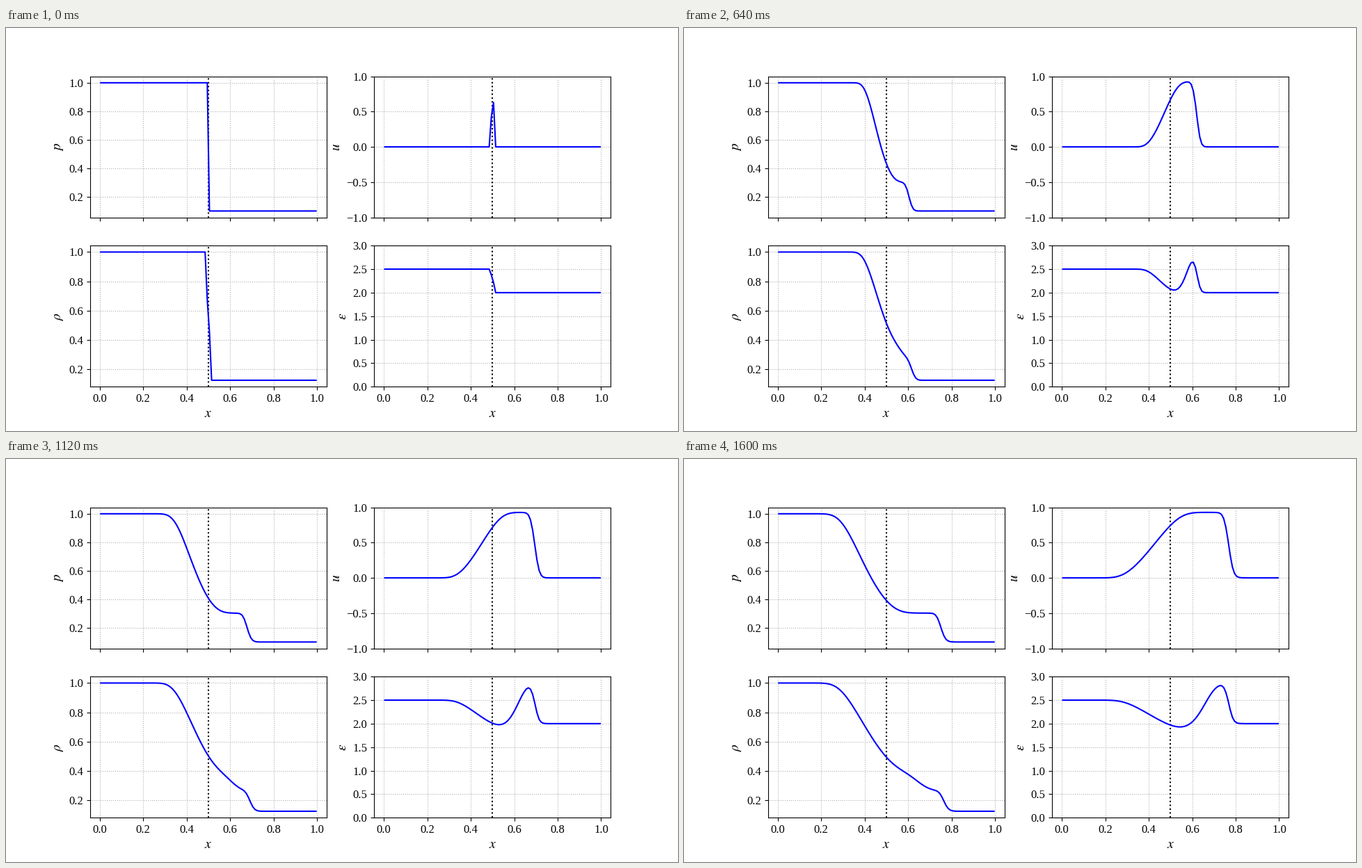
These frames come from a looping animation (966x580 px, 1640 ms). A matplotlib script:

```python
import numpy as np
import matplotlib.pyplot as plt
from matplotlib.animation import FuncAnimation

plt.rcParams.update({
    "font.family": "Liberation Serif",
    "mathtext.fontset": "stix",
    "font.size": 12,
    "axes.labelsize": 14,
})

GAMMA = 1.4
CELLS = 100
CFL = 0.75
FRAMES = 41
DX = 1 / CELLS
x = (np.arange(CELLS) + 0.5) * DX


def primitives(state):
    """Density, velocity, pressure and internal energy of a state."""
    rho, mom, energy = state
    u = mom / rho
    eps = energy / rho - 0.5 * u**2
    return rho, u, (GAMMA - 1) * rho * eps, eps


def advance(state):
    """One first-order step with Rusanov fluxes and open ends."""
    padded = np.pad(state, ((0, 0), (1, 1)), mode="edge")
    rho, u, p, _ = primitives(padded)
    speed = np.max(np.abs(u) + np.sqrt(GAMMA * p / rho))
    flux = np.array([rho * u, rho * u**2 + p, u * (padded[2] + p)])
    face = 0.5 * (flux[:, :-1] + flux[:, 1:]) - 0.5 * speed * np.diff(padded)
    return state - CFL / speed * np.diff(face)


def shock_tube():
    """Rows of (p, u, rho, eps); pressure trails the rest by two steps."""
    left = x < 0.5
    rho = np.where(left, 1.0, 0.125)
    p = np.where(left, 1.0, 0.1)
    state = np.array([rho, 0 * x, p / (GAMMA - 1)])
    history = []
    for _ in range(FRAMES):
        next_p = primitives(state)[2]
        state = advance(state)
        rho, u, _, eps = primitives(state)
        history.append((p, u, rho, eps))
        p = next_p
    return history


history = shock_tube()

fig, axes = plt.subplots(2, 2, sharex=True, figsize=(9.66, 5.8), dpi=100)
panels = [
    ("$p$", (0.055, 1.045)),
    ("$u$", (-1, 1)),
    (r"$\rho$", (0.08125, 1.04375)),
    (r"$\varepsilon$", (0, 3)),
]
lines = []
for ax, (label, limits), values in zip(axes.flat, panels, history[0]):
    ax.axvline(0.5, color="k", ls=":", lw=1.5)
    lines += ax.plot(x, values, "b", lw=1.5)
    ax.set_ylabel(label)
    ax.set_xlim(-0.0445, 1.0445)
    ax.set_ylim(*limits)
    ax.grid(ls=":")
axes[1, 1].set_yticks(np.arange(0, 3.1, 0.5))
for ax in axes[1]:
    ax.set_xlabel("$x$")


def update(frame):
    for line, values in zip(lines, history[frame]):
        line.set_ydata(values)
    return lines


anim = FuncAnimation(fig, update, frames=FRAMES, interval=40,
                     repeat=True, repeat_delay=0)
plt.show()
```
